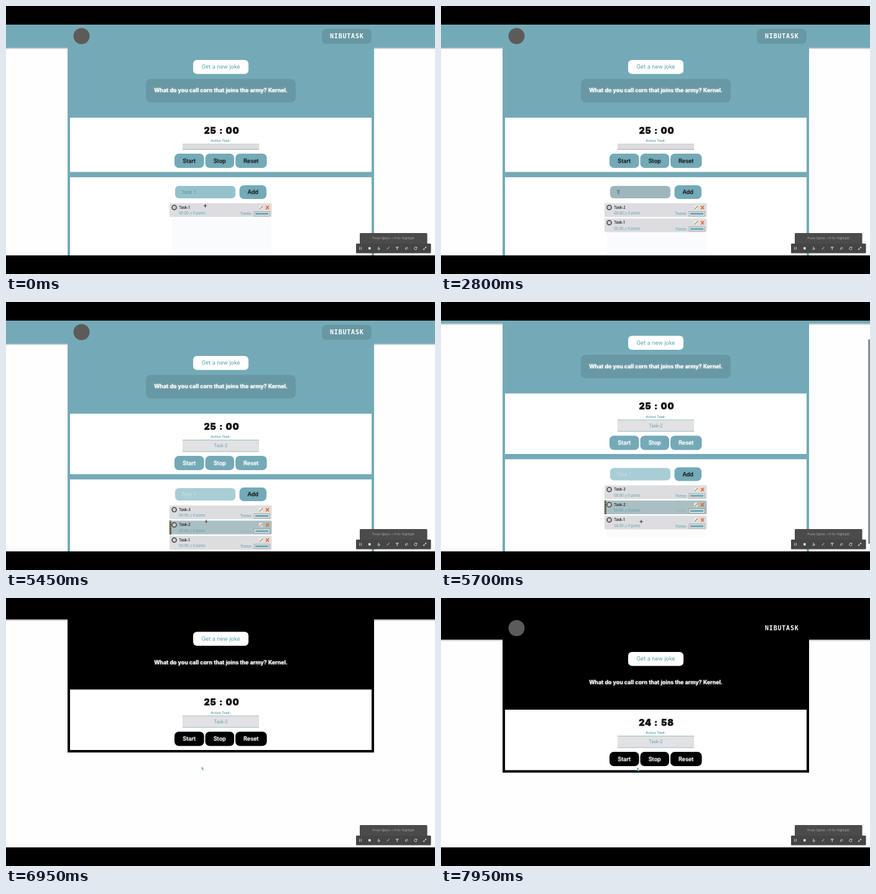
An HTML page that plays this animation: 690 px wide and 432 px high, repeating every 8 s.

```html
<!DOCTYPE html>
<html lang="en">
<head>
<meta charset="utf-8">
<title>Task timer</title>
<style>
  html, body { margin: 0; width: 100%; height: 100%; overflow: hidden; background: #000; }
  svg { display: block; width: 690px; height: 432px; font-family: Inter, "Open Sans", sans-serif; }
  .glow { filter: drop-shadow(.7px .7px .8px rgba(255, 255, 255, .65)); }
  .soft { filter: drop-shadow(.8px .8px .8px rgba(0, 0, 0, .35)); }
</style>
</head>
<body>
<svg id="stage" viewBox="0 0 690 432"></svg>
<script>
const stage = document.getElementById('stage');
const LOOP = 8000;
const TEAL = [116, 170, 183], TEAL_BOX = [104, 152, 164], BLACK = [0, 0, 0];
const INK = '#5d9fae', GREY = '#dddde0';

const CLICK_TASK = 4850, CLICK_START = 6300, TICK = 800;

const clamp = v => Math.max(0, Math.min(1, v));
const span = (t, from, to) => clamp((t - from) / (to - from));
const easeOut = p => 1 - (1 - p) ** 2.2;
const easeInOut = p => p * p * (3 - 2 * p);
const lerp = (a, b, p) => a + (b - a) * p;
const mix = (a, b, p) => `rgb(${a.map((v, i) => Math.round(lerp(v, b[i], p)))})`;

const rect = (x, y, w, h, fill, r = 0, extra = '') =>
  `<rect x="${x}" y="${y}" width="${w}" height="${h}" rx="${r}" fill="${fill}" ${extra}/>`;
const path = (d, color, width = 1, extra = '') =>
  `<path d="${d}" fill="none" stroke="${color}" stroke-width="${width}" ${extra}/>`;
const text = (x, y, size, str, fill, { weight = 400, anchor = 'middle', extra = '' } = {}) =>
  `<text x="${x}" y="${y}" font-size="${size}" font-weight="${weight}" text-anchor="${anchor}" fill="${fill}" ${extra}>${str}</text>`;
const group = (x, y, body, extra = '') => `<g transform="translate(${x} ${y})" ${extra}>${body}</g>`;

function header(color, boxColor) {
  return rect(0, 67, 690, 3, 'url(#shade)') + rect(0, -10, 690, 77, color) +
    '<circle cx="121.5" cy="48.5" r="13" fill="#5d5b59"/>' +
    rect(508, 37, 80, 24, boxColor, 7) +
    text(548.3, 52, 10, 'NIBUTASK', '#fff',
      { weight: 700, extra: 'font-family="DejaVu Sans Mono, monospace" letter-spacing=".8"' });
}

function jokes(boxColor) {
  return rect(301, 87, 89, 22.5, '#fff', 6) +
    text(345.5, 101.4, 8.9, 'Get a new joke', INK) +
    rect(225, 117.5, 241, 38, boxColor, 8) +
    text(345.5, 139.3, 8.9, 'What do you call corn that joins the army? Kernel.', '#fff',
      { weight: 700, extra: 'class="glow"' });
}

function clock(seconds) {
  const pad = n => String(n).padStart(2, '0');
  const part = (x, str) => text(x, 205.6, 14.2, str, '#111',
    { weight: 900, extra: 'stroke="#111" stroke-width=".5" letter-spacing=".8"' });
  return part(328.4, pad(Math.floor(seconds / 60))) + part(346, ':') + part(364.4, pad(seconds % 60));
}

function timer(active, seconds, color, startColor) {
  const grow = active ? 10 : 0;
  const button = (x, w, label, fill) => rect(x, 238 + grow, w, 23, fill, 7) +
    text(x + w / 2, 252.7 + grow, 9.1, label, active ? '#fff' : '#111',
      { weight: 500, extra: `class="${active ? 'glow' : 'soft'}"` });
  return rect(103, 180, 485, 87.5 + grow, '#fff') + clock(seconds) +
    text(345.3, 219, 5.4, 'Active Task:', INK, { weight: 600 }) +
    rect(284, 222.3, 123, 9 + grow, active ? '#e2e1e3' : GREY) +
    path('M284 222.5h123', active ? '#86b4c0' : '#c4c8cb', .8) +
    path(`M284 ${231.2 + grow}h123`, active ? '#86b4c0' : '#8f989b', .8) +
    (active ? text(345.5, 234.2, 6.9, 'Task-2', INK) : '') +
    button(271, 47.5, 'Start', startColor) + button(320.5, 46.5, 'Stop', color) +
    button(369, 50.5, 'Reset', color);
}

function taskRow(y, n, active) {
  const stripes = path('M264.3 0v22', '#333', 3) +
    path('M264.3 1v21', '#a9ad62', 2.4, 'stroke-dasharray="1.5 1.5"');
  return group(0, y,
    rect(263, 0, 164.5, 22, active ? '#aabfc3' : GREY, 1.5) + (active ? stripes : '') +
    '<circle cx="270.6" cy="6.7" r="3.6" fill="#c9c9d0" stroke="#333" stroke-width="1.3"/>' +
    text(278.3, 8.9, 5.6, `Task-${n}`, '#222', { weight: 600, anchor: 'start' }) +
    text(278.3, 18.2, 5.5, '00:00 // 0 pomo', INK, { anchor: 'start' }) +
    text(386.3, 19, 5.5, 'Theme:', active ? '#93b4bc' : INK) +
    rect(399, 13.4, 25, 7, '#fff', 0, 'stroke="#888" stroke-width=".8"') +
    rect(400.6, 15, 21.8, 3.8, '#74aab7') +
    rect(407.2, 3.6, 5.5, 6.4, '#f0ece4') +
    path('M408 9.5l5-5', '#b39466', 1.5) +
    path('M418.3 4.4l4.4 5M422.9 4l-4.8 5.8', '#ee6a1f', 1.6));
}

function typedTask(t) {
  const typing = (start, end, word) => word.slice(0, Math.ceil(span(t, start, end) * word.length));
  if (t >= 1950 && t < 2400) return typing(1925, 2100, 'Task-2');
  if (t > 2800 && t < 3400) return typing(2800, 3200, 'Task-3');
  return '';
}

function taskPanel(t, active, color) {
  const typed = typedTask(t);
  const focus = span(t, 150, 400);
  const fill = t < CLICK_TASK - 500 ? mix([147, 194, 205], [157, 182, 188], focus)
    : mix([157, 182, 188], [168, 205, 213], span(t, CLICK_TASK - 500, CLICK_TASK - 200));
  const hint = t < 400 ? '#6c8e98' : t < 4500 ? '#bccacd' : '#c9dfe4';
  const focused = t >= 400 && t < 4500;
  const caretOn = Math.floor(t / 400) % 2 === 1 || typed;
  const count = t < 2400 ? 1 : t < 3400 ? 2 : 3;
  let rows = '';
  for (let i = 0; i < count; i++) rows += taskRow(318 + i * 24.5, count - i, active && count - i === 2);
  return group(0, active ? 10 : 0,
    rect(103, 276, 485, 200, '#fff') + rect(267, 320, 160, 82, '#fafbfd') +
    rect(272, 290, 97, 20, fill, 6) +
    text(282, 303.2, 8, typed || 'Task 1', typed ? '#445e66' : hint, { anchor: 'start' }) +
    (focused && caretOn ? path(`M${282 + typed.length * 4.3} 295.5v9`, '#445e66', .6) : '') +
    rect(375.5, 289, 43.5, 22, color, 7) +
    text(397.2, 303.3, 9.1, 'Add', '#111', { weight: 500, extra: 'class="soft"' }) + rows);
}

function toolbar() {
  const icons = [
    'M-1.3-2.2v4.4M1.3-2.2v4.4', 'M-1.8 0h3.6', 'M-.5-2.5v3.2M-1.7 .4q.2 1.8 1.7 1.8t1.6-1.7L-.4-.5',
    'M-2 2L2-2', 'M-2-2h4L0 .4zM0 0v2.5', 'M-2 .6L.5-2l1.7 1.8L0 2z',
    'M1.8-1.2A2.2 2.2 0 1 0 2.2 .6M2.2-2.3v1.6h-1.6', 'M-2 2L2-2M.3-2H2v1.7M-2 .3V2h1.7'
  ];
  return rect(569, 366, 108.5, 18, '#4b4b4b', 1.5) + rect(563, 383, 120.5, 15.5, '#454545', 1) +
    text(623, 375.8, 4.8, 'Press Option + H for Highlight', '#aaa') +
    icons.map((d, i) => group(570 + i * 14.8, 390.6, path(d, '#ddd', i === 1 ? 3.8 : .9))).join('');
}

function cursor(t) {
  const cross = (x, y) => group(x, y, path('M-2.8 0h5.6M0-2.8v5.6', '#fff', 2) + path('M-2.7 0h5.4M0-2.7v5.4', '#222', 1.1));
  const hand = (x, y) => group(x, y,
    '<path d="M-1.6-3l4 2.6-1.5.5 1 2.4-1.6.5-1-2.3-1 1z" fill="#6fa9cb" stroke="#dfeaf0" stroke-width=".4"/>');
  if (t < 400) return cross(320.5, lerp(322, 303, easeInOut(span(t, 50, 400))));
  if (t < 4000) return '';
  if (t < 5750) {
    const p = easeInOut(span(t, 4000, 4800));
    return cross(lerp(319, 322, p), lerp(302, 354, p));
  }
  if (t < 6500) {
    const p = easeInOut(span(t, 5750, 6200));
    const x = lerp(322, 297, p), y = lerp(354, 241, p);
    return p < .9 ? cross(x, y) : hand(x, y);
  }
  const p = easeInOut(span(t, 6500, 7000));
  return hand(lerp(297, 316.7, p), lerp(241, 276, p));
}

function scrollBar(t) {
  if (t > 5520 && t < 6100) return rect(687, 60, 3, 330, '#8b8b8b', 1.5);
  if (t > 7050 && t < 7700) return rect(687, 61, 3, 315, '#8b8b8b', 1.5);
  return '';
}

function scene(t) {
  const active = t >= CLICK_TASK, running = t >= CLICK_START;
  const dark = easeOut(span(t, CLICK_START, CLICK_START + 550));
  const color = mix(TEAL, BLACK, dark), boxColor = mix(TEAL_BOX, BLACK, dark);
  const hover = span(t, 6200, 6300) * (1 - span(t, 6550, 6700));
  const startColor = mix(TEAL.map(v => v * (1 - dark)), [130, 150, 160], hover * .47);
  const scroll = 32.5 * (easeOut(span(t, 5500, 5700)) - easeInOut(span(t, 6980, 7370)));
  const seconds = 1500 - (running ? Math.floor((t - CLICK_START) / TICK) : 0);
  const bottom = running ? 281.5 : 480;

  return `<defs>
      <clipPath id="view"><rect y="30" width="690" height="372"/></clipPath>
      <linearGradient id="shade" x2="0" y2="1"><stop stop-color="#a5a9ab"/><stop offset="1" stop-color="#a5a9ab" stop-opacity="0"/></linearGradient>
    </defs>` +
    rect(0, 0, 690, 432, '#000') +
    `<g clip-path="url(#view)">` + rect(0, 30, 690, 372, '#fefefe') +
    group(0, -scroll,
      rect(99, 60, 493, bottom - 60, color) +
      header(running ? '#000' : color, running ? '#000' : boxColor) +
      rect(99, 66.5, 493, 5, color) +
      jokes(boxColor) + timer(active, seconds, color, startColor) +
      (running ? '' : taskPanel(t, active, color))) +
    scrollBar(t) + toolbar() + cursor(t) + '</g>';
}

const begin = performance.now();
function draw(now) {
  stage.innerHTML = scene(Math.max(0, now - begin) % LOOP);
  requestAnimationFrame(draw);
}
draw(begin);
</script>
</body>
</html>
```
